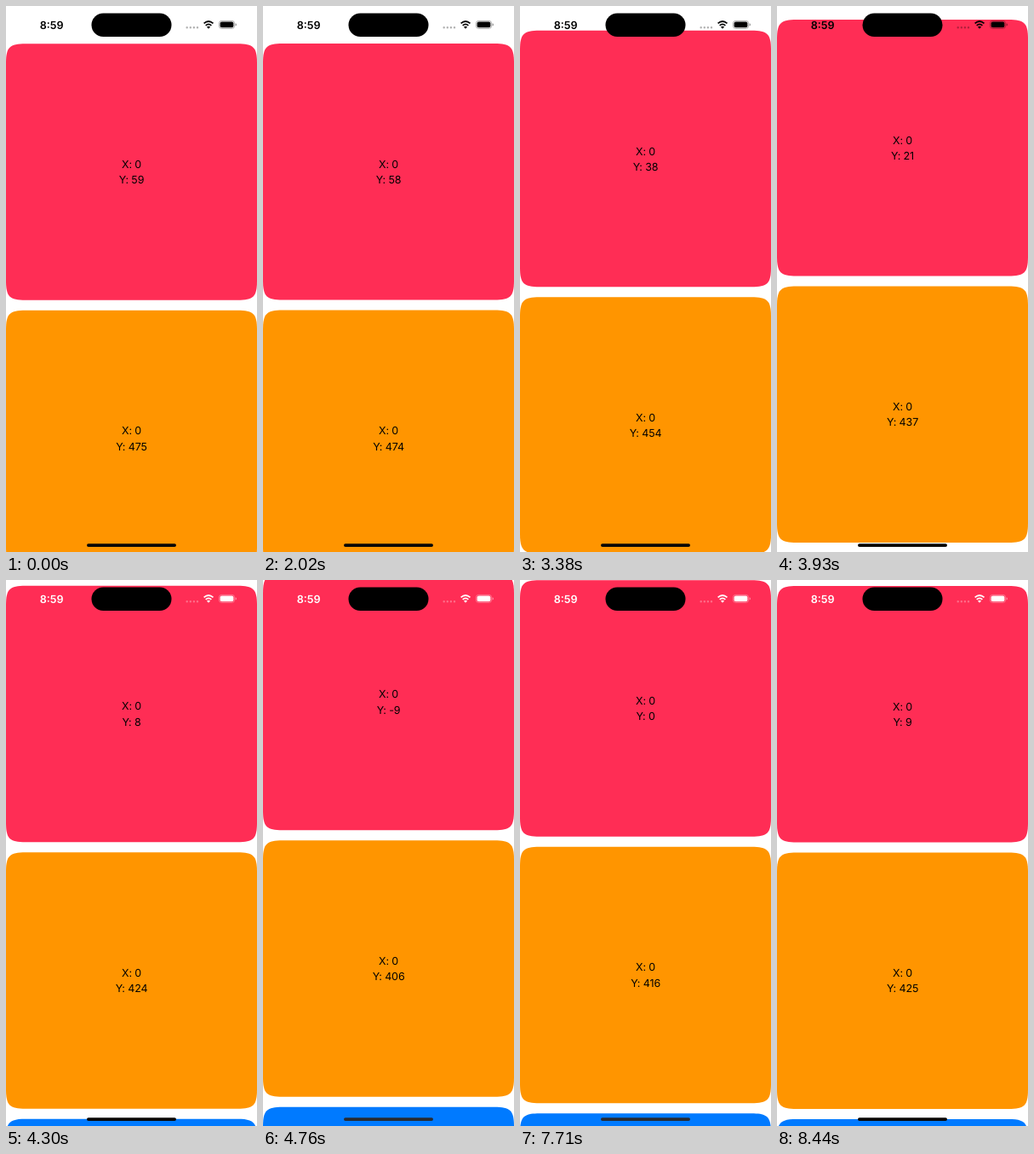
Animation of 295 by 640 pixels, one loop 8.67 s. Source, as an HTML page:

```html
<!DOCTYPE html>
<html lang="en">
<head>
<meta charset="utf-8">
<title>Scrolling cards</title>
<style>
  html, body { margin: 0; width: 100%; height: 100%; overflow: hidden; background: #fff; }
  svg { display: block; width: 100%; height: 100%; }
  text { font-family: Inter, sans-serif; text-rendering: geometricPrecision; }
  .card text { font-size: 12.5px; letter-spacing: -.1px; text-anchor: middle; fill: #000; }
  .time { font-size: 12.6px; font-weight: 600; }
  .line { fill: none; stroke: currentColor; }
</style>
</head>
<body>
<svg viewBox="0 0 295 640">
  <g id="cards"></g>
  <rect x="100.5" y="8.5" width="94" height="27.6" rx="13.8"/>
  <g id="status">
    <text class="time" x="39.8" y="26.7">8:59</text>
    <path class="line" d="M212.7 25.3h12.5" stroke-width="2.5" stroke-linecap="round" stroke-dasharray="0 4.1" opacity=".3"/>
    <path class="line" d="M232.6 20.4Q238 15.6 243.5 20.4M234.7 22.8Q238 19.8 241.4 22.8" stroke-width="1.7"/>
    <path d="M236 24.5Q238 22.9 240.1 24.5L238 26.7z"/>
    <rect class="line" x="250.4" y="17.4" width="18.2" height="9" rx="3" stroke-width=".8" opacity=".4"/>
    <rect x="251.6" y="18.6" width="15.8" height="6.6" rx="1.9"/>
    <path d="M269.6 20.3Q271 20.6 271 21.9T269.6 23.5z" opacity=".45"/>
  </g>
  <rect id="home" x="95" y="630.2" width="105" height="3.8" rx="1.9"/>
</svg>
<script>
const LOOP = 8670, TICK = 119;                 // ms; the scroll advances once per tick
const SCALE = 640 / 852, PITCH = 416, START_Y = 59; // px per pt, then pt

const speedUp = u => u ** 1.74;
const slowDown = u => 1 - (1 - u) ** 3;
const drags = [
  { start: 2020, ticks: 24, to: -9.7, ease: speedUp },
  { start: 5520, ticks: 8, to: 0.3, ease: slowDown },
  { start: 7850, ticks: 6, to: 9.3, ease: slowDown }
];

function scrollAt(t) {
  let y = START_Y;
  for (const { start, ticks, to, ease } of drags) {
    if (t < start) break;
    const done = Math.floor((t - start) / TICK) + 1;
    y += (to - y) * ease(Math.min(1, done / ticks));
  }
  return y;
}

// Card outline with continuous-curvature corners
const outline = (w, h, r = 23, c = 4) =>
  `M0 ${r}C0 ${c} ${c} 0 ${r} 0H${w - r}C${w - c} 0 ${w} ${c} ${w} ${r}` +
  `V${h - r}C${w} ${h - c} ${w - c} ${h} ${w - r} ${h}H${r}C${c} ${h} 0 ${h - c} 0 ${h - r}z`;

const byId = id => document.getElementById(id);
const path = outline(295, 400 * SCALE);
byId('cards').innerHTML = ['#ff2d55', '#ff9500', '#007aff'].map(color => `
  <g class="card"><path d="${path}" fill="${color}"/>
  <text x="147.6" y="145.7">X: 0</text><text class="y" x="147.6" y="164"></text></g>`).join('');
const cards = [...document.querySelectorAll('.card')];
const labels = cards.map(card => card.querySelector('.y'));

function draw() {
  const y = scrollAt(performance.now() % LOOP);
  cards.forEach((card, i) => {
    const top = y + i * PITCH;
    card.setAttribute('transform', `translate(0 ${top * SCALE})`);
    labels[i].textContent = `Y: ${Math.trunc(top)}`;
  });
  const ink = y < 12 ? '#fff' : '#000';
  byId('status').setAttribute('fill', ink);
  byId('status').setAttribute('color', ink);
  byId('home').setAttribute('fill', y < 6 ? '#272b33' : '#0a0806');
  requestAnimationFrame(draw);
}
draw();
</script>
</body>
</html>
```
